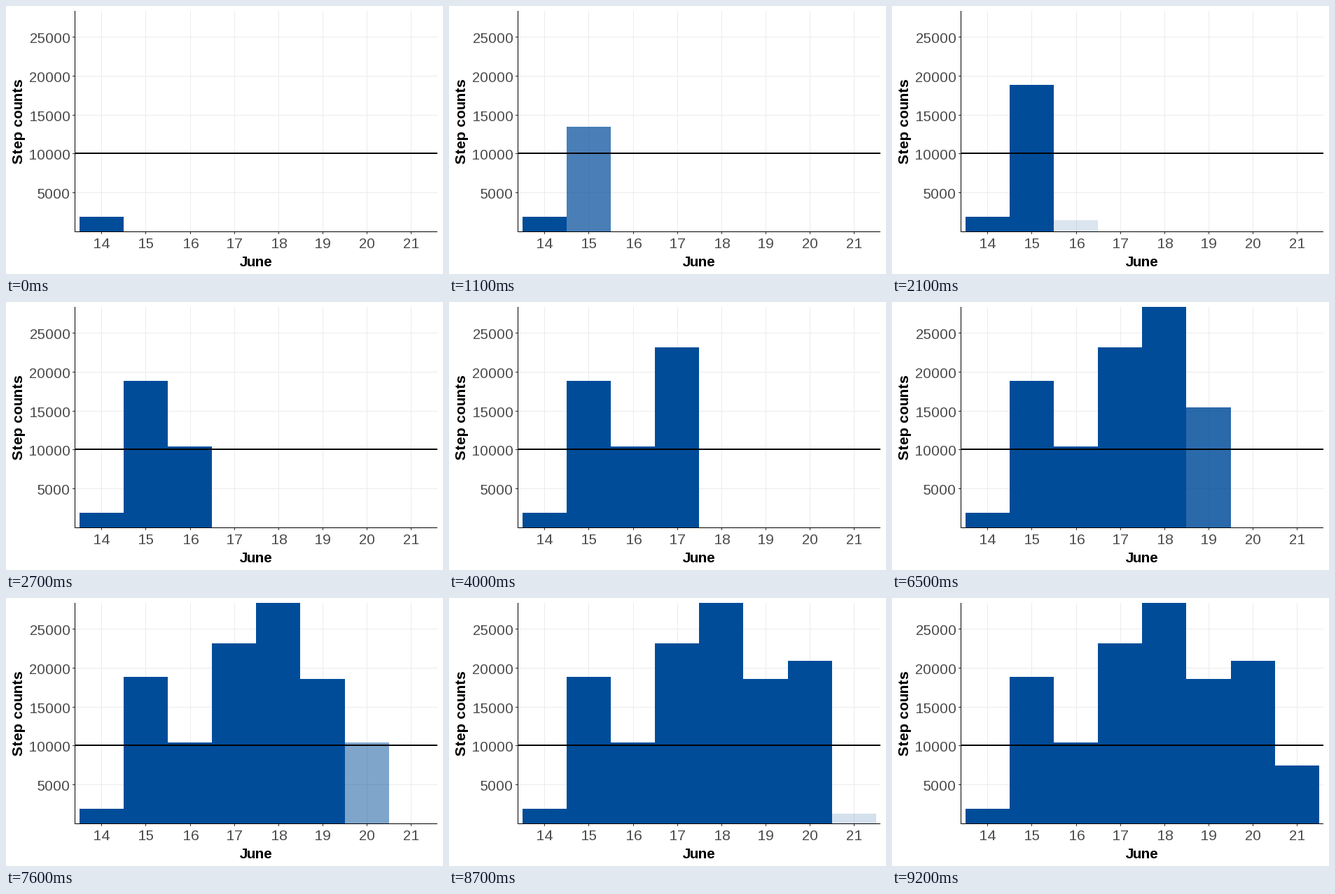
Write a matplotlib script that moves like this. It is 624 px wide and 384 px high and loops after 10000 ms.

```python
import matplotlib.pyplot as plt
from matplotlib.animation import FuncAnimation
from matplotlib.patches import Rectangle

W, H, DPI = 624, 384, 96
FRAMES, INTERVAL = 100, 100

LEFT, RIGHT, TOP, BASE = 99, 616, 7, 323
STEP_X, STEP_Y = 63.1, 55.78  # pixels per day and per 5000 steps

BLUE, GRID, TICK, LABEL = "#004C99", "#EBEBEB", "#333333", "#4D4D4D"

# day, step count, first frame of growth, frames of growth
DAYS = [
    (14, 1900, 0, 1),
    (15, 18860, 7, 7),
    (16, 10430, 21, 7),
    (17, 23170, 35, 6),
    (18, 28360, 48, 6),
    (19, 18590, 61, 6),
    (20, 20930, 74, 6),
    (21, 7480, 87, 6),
]

plt.rcParams["font.family"] = "Liberation Sans"
plt.rcParams["font.size"] = 16
plt.rcParams["text.hinting_factor"] = 1

fig = plt.figure(figsize=(W / DPI, H / DPI), dpi=DPI, facecolor="white")
ax = fig.add_axes([0, 0, 1, 1])
ax.set_xlim(0, W)
ax.set_ylim(H, 0)
ax.axis("off")


def y_of(count):
    return 323.4 - count / 5000 * STEP_Y


def box(x0, y0, x1, y1, color, z):
    patch = Rectangle((x0, y0), x1 - x0, y1 - y0, facecolor=color, linewidth=0,
                      antialiased=False, snap=False, zorder=z)
    return ax.add_patch(patch)


# Grid, ticks and labels
for count in range(5000, 25001, 5000):
    row = int(y_of(count))
    box(LEFT, row, RIGHT, row + 1, GRID, 1)
    box(95, row, 98, row + 1, TICK, 4)
    ax.text(92, row + 9, str(count), color=LABEL, ha="right", va="baseline")

bars = []
for k, (day, *_) in enumerate(DAYS):
    col = round(136.38 + STEP_X * k)
    box(col, TOP, col + 1, BASE, GRID, 1)
    box(col, BASE + 1, col + 1, BASE + 4, TICK, 4)
    ax.text(col + 0.5, 347, str(day), color=LABEL, ha="center", va="baseline")
    x0, x1 = (round(104.95 + STEP_X * i) for i in (k, k + 1))
    bars.append(box(x0, BASE, x1, BASE, BLUE, 2))

# Daily goal and axis lines
box(LEFT, 210, RIGHT, 212, "black", 3)
box(98, TOP, 99, BASE + 1, "black", 4)
box(98, BASE, RIGHT, BASE + 1, "black", 4)

ax.text(357, 373, "June", weight="bold", ha="center", va="baseline")
ax.text(24, 165.5, "Step counts", weight="bold", rotation=90,
        rotation_mode="anchor", ha="center", va="baseline")


def update(frame):
    for bar, (_, count, start, length) in zip(bars, DAYS):
        p = min(max((frame - start + 1) / length, 0), 1)
        top = min(round(y_of(count * p)), BASE)
        bar.set_y(top)
        bar.set_height(BASE - top)
        bar.set_alpha(p)
    return bars


anim = FuncAnimation(fig, update, frames=FRAMES, interval=INTERVAL,
                     repeat=True, repeat_delay=0, blit=False)
plt.show()
```
